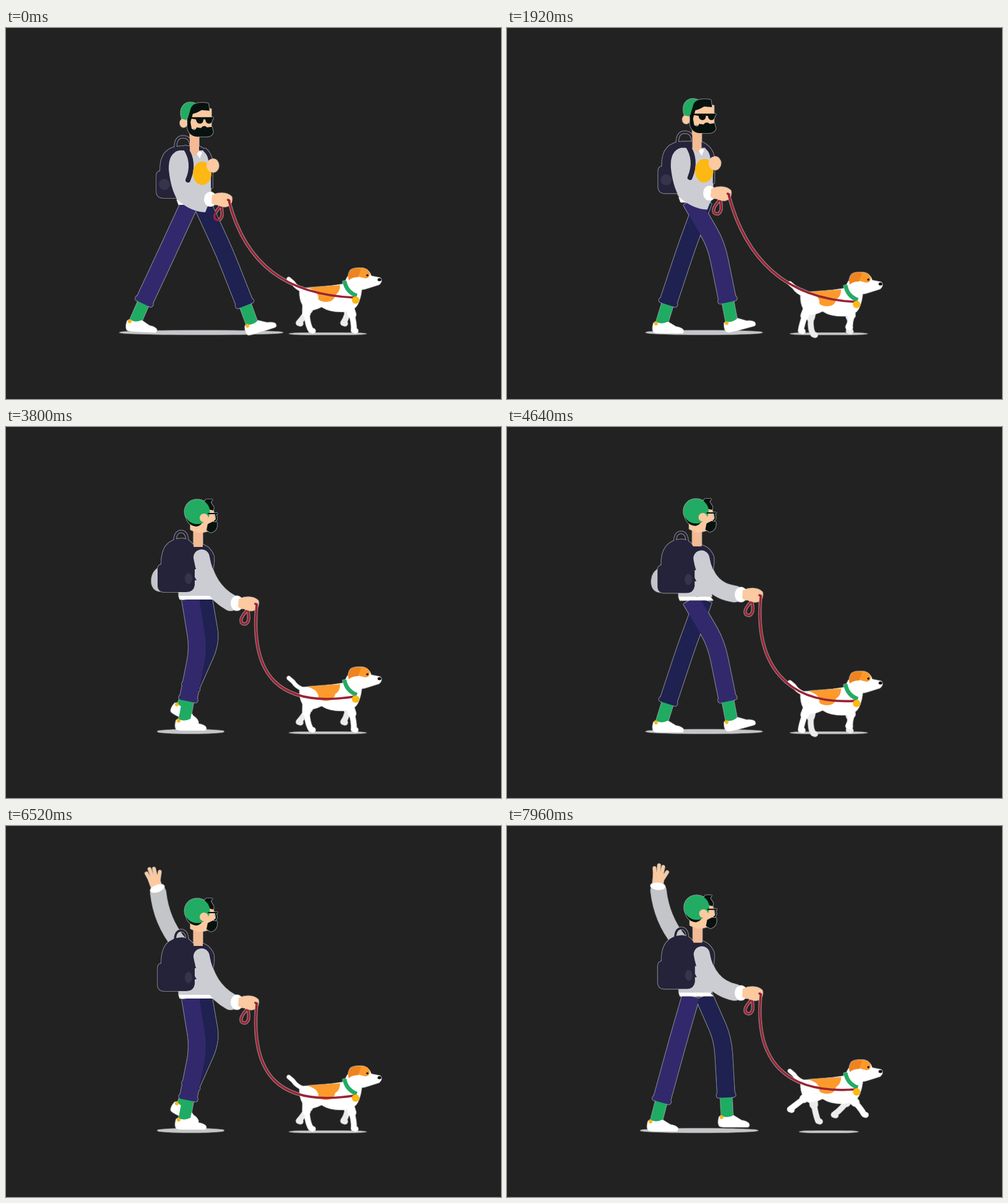
Recreate the animation shown at these times as an HTML page with a canvas. Size 800 px wide and 600 px high, loop 8000 ms.

```html
<!DOCTYPE html>
<html lang="en">
<head>
<meta charset="utf-8">
<title>Walking the dog</title>
<style>
html, body { margin: 0; width: 100%; height: 100%; overflow: hidden; background: #222; }
canvas { display: block; width: 800px; height: 600px; }
</style>
</head>
<body>
<canvas id="stage" width="800" height="600"></canvas>
<script>
const stage = document.getElementById('stage');
const ctx = stage.getContext('2d');
const mask = Object.assign(document.createElement('canvas'), { width: 800, height: 600 });
const maskCtx = mask.getContext('2d');
const LOOP = 8000, FPS = 24, STRIDE = 32.5, TROT = 13;
const TURN_AT = 66, WAVE_AT = 131;
const C = {
  bg: '#222222', skin: '#fcc9a0', neck: '#f3ba93', hair: '#07120f', cap: '#22ac63',
  shirt: '#cccdd3', sleeve: '#c4c5c8', pack: '#25233a', packLine: '#36344a',
  near: '#32296c', far: '#1f2150', sock: '#20ab63', yellow: '#fdb813',
  leash: '#9b2335', fur: '#ffffff', furFar: '#ececee', patch: '#fd9a2b', ear: '#ee8420',
  shadow: '#c5c6c9', white: '#ffffff'
};

// Rows: phase, then values. Phases wrap at 1.
const BODY = [ // sway x, bob y, hand x, hand y
  [0, -6, 9, 8, -4], [.25, -4, 11, 4, 0], [.6, 0, 0, 0, 0], [.68, -1.5, -10, 3, -9],
  [.754, -2.5, -3.5, 5, -15], [.83, -3.5, 1.5, 5, -14]
];
const LEG = [ // knee, ankle, foot angle
  [0, 342, 365, 386, 477, -18], [.1, 336, 366, 362, 473, 0], [.3, 311, 358, 288, 473, 0],
  [.377, 277, 345, 241, 476, 0], [.415, 278, 355, 238, 476, 0], [.5, 258, 368, 209, 473, 3],
  [.65, 285, 360, 222, 455, 40], [.8, 319, 347, 273, 451, 26],
  [.877, 337, 345, 344, 469, 0], [.915, 338, 350, 363, 473, -15]
];
const HIND = [[0, 493, 489], [.19, 503, 487], [.5, 473, 477], [.54, 475, 483], [.69, 457, 468], [.85, 472, 473]];
const FORE = [[0, 562, 489], [.04, 552, 483], [.19, 528, 477], [.5, 545, 477], [.69, 577, 476]];
const HOP = [[0, 0], [.06, 5], [.19, -9], [.35, -5], [.46, 1], [.54, 7], [.69, -10], [.85, -5]];

function sample(table, phase) {
  const p = ((phase % 1) + 1) % 1;
  let i = table.length - 1;
  while (table[i][0] > p) i--;
  const a = table[i], b = table[(i + 1) % table.length];
  const end = i + 1 < table.length ? b[0] : 1;
  const k = (p - a[0]) / (end - a[0]);
  return a.slice(1).map((v, j) => v + (b[j + 1] - v) * k);
}

function fill(color, d) {
  ctx.fillStyle = color;
  ctx.fill(new Path2D(d));
}
function line(color, width, d, cap = 'round') {
  ctx.strokeStyle = color;
  ctx.lineWidth = width;
  ctx.lineCap = cap;
  ctx.lineJoin = 'round';
  ctx.stroke(new Path2D(d));
}
function oval(color, x, y, rx, ry = rx) {
  ctx.fillStyle = color;
  ctx.beginPath();
  ctx.ellipse(x, y, rx, ry, 0, 0, Math.PI * 2);
  ctx.fill();
}
function at(x, y, draw, degrees = 0) {
  ctx.save();
  ctx.translate(x, y);
  ctx.rotate(degrees * Math.PI / 180);
  draw();
  ctx.restore();
}

function leg(pose, hipX, hipY, color) {
  const [kx, ky, ax, ay, angle] = pose;
  const len = Math.hypot(ax - kx, ay - ky), ux = (ax - kx) / len, uy = (ay - ky) / len;
  const cx = ax - ux * 31, cy = ay - uy * 31;
  line(C.sock, 19, `M${cx} ${cy}L${ax} ${ay + 2}`, 'butt');
  at(ax, ay, () => {
    fill(C.white, 'M-13 1Q-16 11 -13 16Q-11 18 0 18L32 18Q37 18 35 12Q31 8 23 7L10 -1Q0 4 -9 0Z');
    oval(C.yellow, -9, 2, 3);
  }, angle);
  const blend = (a, b, k) => a + (b - a) * k;
  const mx = blend(hipX, kx, .72), my = blend(hipY, ky, .72);
  const nx = blend(kx, cx, .28), ny = blend(ky, cy, .28);
  line(color, 28, `M${hipX} ${hipY}L${mx} ${my}Q${kx} ${ky} ${nx} ${ny}L${cx} ${cy}`, 'butt');
  line(color, 8, `M${cx - uy * 11.5 - ux * 3} ${cy + ux * 11.5 - uy * 3}L${cx + uy * 11.5 - ux * 3} ${cy - ux * 11.5 - uy * 3}`);
}

function leashHand(x, y) {
  line(C.leash, 3.5, `M${x + 7} ${y + 9}Q${x - 9} ${y + 25} ${x - 4} ${y + 32}Q${x + 4} ${y + 37} ${x + 7} ${y + 27}Q${x + 8} ${y + 18} ${x + 5} ${y + 9}`);
  oval(C.white, x - 12, y, 10, 12);
  fill(C.skin, `M${x - 9} ${y - 7}Q${x + 12} ${y - 15} ${x + 23} ${y - 4}Q${x + 25} ${y + 9} ${x + 14} ${y + 12}Q${x + 6} ${y + 13} ${x} ${y + 9}Q${x - 9} ${y + 9} ${x - 10} ${y + 5}Z`);
}

function headFront() {
  fill(C.neck, 'M303 160H318V194L311 203L303 194Z');
  fill(C.skin, 'M300 126H338V158H300Z');
  oval(C.skin, 293, 149, 6, 7);
  fill(C.cap, 'M290 142Q285 126 295 118Q302 113 312 117L308 130L297 144Z');
  fill(C.hair, 'M305 124Q310 113 333 117L335 129L322 128Q314 133 308 134L304 148L299 144Z');
  fill(C.hair, 'M299 141L303 141L306 158Q312 163 314 156L321 157Q326 151 331 156L339 155L341 164Q339 171 330 171L314 171Q302 170 299 157Z');
  fill(C.hair, 'M303 139.5H341V143H339.5Q339 150 334 150Q329 150 328 143H325Q325 150 319.5 150Q314 150 313 143L303 141.5Z');
}

function headBack() {
  fill(C.neck, 'M303 160H318V194H303Z');
  fill(C.skin, 'M298 150H320V134H335L338 149L328 168L312 172L298 166Z');
  fill(C.hair, 'M320 122L323 117H334L331 122L336 130L335 135L322 132Z');
  fill(C.hair, 'M291 147L318 151Q317 159 308 161Q295 160 291 147Z');
  fill(C.hair, 'M326 157L334 153L341 154Q343 168 331 171L324 167Z');
  oval(C.cap, 309, 137, 20.5, 20);
  oval(C.skin, 320, 147, 7);
  line(C.hair, 2, 'M327 140H341M339 141Q342 151 337 152');
}

function bodyFront(sway, bob, hx, hy) {
  at(sway * .5, bob, () => {
    line(C.pack, 3.5, 'M277 187Q276 167 289 167Q301 167 302 181');
    fill(C.pack, 'M246 230Q246 223 252 222Q251 183 286 182H315Q336 190 337 212V250H300V266H258Q246 266 246 255Z');
    oval(C.packLine, 259, 244, 9);
  });
  at(sway * .65, bob * .55, () => {
    fill(C.white, 'M280 273H320V281H283Z');
    fill(C.shirt, 'M284 193Q266 197 267 224Q270 255 281 273Q302 292 326 293L335 270V202L324 193H300Z');
    line(C.pack, 8, 'M294 189Q310 213 298 241');
    line(C.pack, 6, 'M326 193Q333 199 334 210');
    oval(C.yellow, 321, 230, 15, 19);
    fill(C.white, 'M309 193L317 206L321 196Z');
  });
  at(sway, bob - .7 * Math.abs(sway), headFront);
  at(sway * .65, bob * .5, () => oval(C.skin, 338, 218, 10, 11));
  leashHand(334 + hx, 281 + hy);
}

function wavingArm(frame) {
  line(C.sleeve, 25, 'M280 190Q251 154 246 108');
  const swing = -7.5 - 13.5 * Math.sin(Math.PI * 2 * 3 * frame / 65);
  at(245, 102, () => {
    fill(C.skin, 'M-9 0L-9 -20Q0 -27 9 -20L8 0Z');
    line(C.skin, 5, 'M-6 -17L-8 -30M-1 -18L-1 -35M4 -18L6 -33M6 -12L13 -25');
    oval(C.white, 0, -1, 12, 6);
  }, swing);
}

function bodyBack(sway, bob, hx, hy, frame) {
  at(sway * .5, bob, () => {
    if (frame >= WAVE_AT) wavingArm(frame);
    else fill(C.sleeve, 'M250 226Q235 232 235 250Q236 265 250 266Z');
    line(C.pack, 3.5, 'M273 186Q273 169 283 169Q293 169 293 186');
    fill(C.pack, 'M300 190Q326 184 336 208Q338 226 330 240H300Z');
    fill(C.shirt, 'M279 230H328L333 273H279Z');
    fill(C.white, 'M279 273H330L335 279H281Z');
  });
  at(sway, bob - .7 * Math.abs(sway), headBack);
  at(sway * .5, bob, () => {
    fill(C.pack, 'M245 230Q245 223 251 222Q250 182 284 180Q304 182 305 202V256Q303 267 292 267H256Q245 267 245 256Z');
    oval(C.packLine, 295, 245, 6, 9);
    fill(C.pack, 'M302 237L308 248H302Z');
  });
  const x = 385 + hx, y = 285 + hy, sx = 316 + sway * .5, sy = 211 + bob;
  line(C.shirt, 26, `M${sx} ${sy}Q${sx + 9} ${sy + 52} ${x - 22} ${y - 1}`);
  leashHand(x, y);
}

function dogLeg(table, phase, hipX, hipY, color) {
  const [x, y] = sample(table, phase);
  const hock = Math.max(-8, Math.min(16, (485 - y) * 1.6 - 2));
  const bendX = table === HIND ? x + hock : (hipX + x) / 2 + 5, bendY = y - 12;
  line(color, 13, `M${hipX} ${hipY}L${(hipX + bendX) / 2} ${(hipY + bendY) / 2}`);
  line(color, 8.5, `M${hipX} ${hipY}Q${bendX} ${bendY} ${x} ${y}L${x + 3} ${y + 1}`);
}

function dogBody(phase) {
  dogLeg(HIND, phase + .5, 494, 446, C.furFar);
  dogLeg(FORE, phase + .5, 552, 450, C.furFar);
  line(C.fur, 6, 'M479 424Q469 420 464 412L457 406');
  dogLeg(HIND, phase, 486, 446, C.fur);
  dogLeg(FORE, phase, 555, 450, C.fur);
  fill(C.fur, 'M475 421Q510 420 546 414L552 402L575 420Q574 434 570 443Q565 458 545 459Q524 460 510 451Q498 457 487 457Q472 444 475 421Z');
  fill(C.patch, 'M487 420L540 416Q540 427 532 432Q530 443 517 443Q502 442 505 434Q502 424 487 420Z');
  fill(C.fur, 'M553 403Q556 389 571 388Q587 389 590 401L605 404Q609 410 603 415L584 421Q569 427 559 416Z');
  fill(C.patch, 'M565 389Q583 385 588 397Q588 404 581 405L569 402Z');
  fill(C.ear, 'M557 391Q566 386 574 390L569 403Q559 403 554 408Q551 399 557 391Z');
  oval(C.hair, 584, 400, 1.8);
  oval(C.hair, 603.5, 407, 3, 2.5);
  line(C.cap, 6.5, 'M547 409Q550 427 567 433', 'butt');
}

// Pale hairline around the silhouette, then the backdrop behind everything.
function finish() {
  maskCtx.globalCompositeOperation = 'copy';
  maskCtx.drawImage(stage, 0, 0);
  maskCtx.globalCompositeOperation = 'source-in';
  maskCtx.fillStyle = C.white;
  maskCtx.fillRect(0, 0, 800, 600);
  ctx.save();
  ctx.globalCompositeOperation = 'destination-over';
  ctx.globalAlpha = .4;
  for (const [dx, dy] of [[1, 0], [-1, 0], [0, 1], [0, -1]]) ctx.drawImage(mask, dx, dy);
  ctx.globalAlpha = 1;
  ctx.fillStyle = C.bg;
  ctx.fillRect(0, 0, 800, 600);
  ctx.restore();
}

function render(time) {
  const frame = Math.floor(time % LOOP * FPS / 1000 + 1e-6);
  const walk = frame / STRIDE, trot = frame / TROT;
  const [sway, bob, hx, hy] = sample(BODY, walk * 2);
  const [hop] = sample(HOP, trot);
  const front = frame < TURN_AT;

  ctx.clearRect(0, 0, 800, 600);

  const nearLeg = sample(LEG, walk + .5), farLeg = sample(LEG, walk);
  farLeg[0] += 12;
  farLeg[2] += 12;
  const left = Math.min(nearLeg[2], farLeg[2]) - 26, right = Math.max(nearLeg[2], farLeg[2]) + 50;
  oval(C.shadow, (left + right) / 2, 492.5, Math.max(54, (right - left) / 2), 3.2);
  oval(C.shadow, 520, 494.5, 63 + Math.min(0, hop) * 1.5, 1.6);

  const hipY = 278 + bob * .8;
  leg(farLeg, 319 + sway * .3, hipY, C.far);
  leg(nearLeg, 298 + sway * .3, hipY, C.near);

  at(0, hop, () => dogBody(trot));
  if (front) bodyFront(sway, bob, hx, hy);
  else bodyBack(sway, bob, hx, hy, frame);

  const x = (front ? 355 : 405) + hx * (front ? .7 : 1), y = (front ? 283 : 287) + hy;
  const curve = front
    ? `${x + 27} ${y + 104} ${x + 92} ${431 + hop}`
    : `${x - 10} ${y + 114 + hy * .4} ${440 + hx * 2} ${455 + hy * .8 + hop * .9}`;
  line(C.leash, 3.6, `M${x - 2} ${y - 1}Q${x + 2} ${y} ${x} ${y + 2}C${curve} 563 ${436 + hop}`);
  oval(C.yellow, 565, 440 + hop, 6);
  finish();
}

function tick(now) {
  render(now);
  requestAnimationFrame(tick);
}
render(0);
requestAnimationFrame(tick);
</script>
</body>
</html>
```
